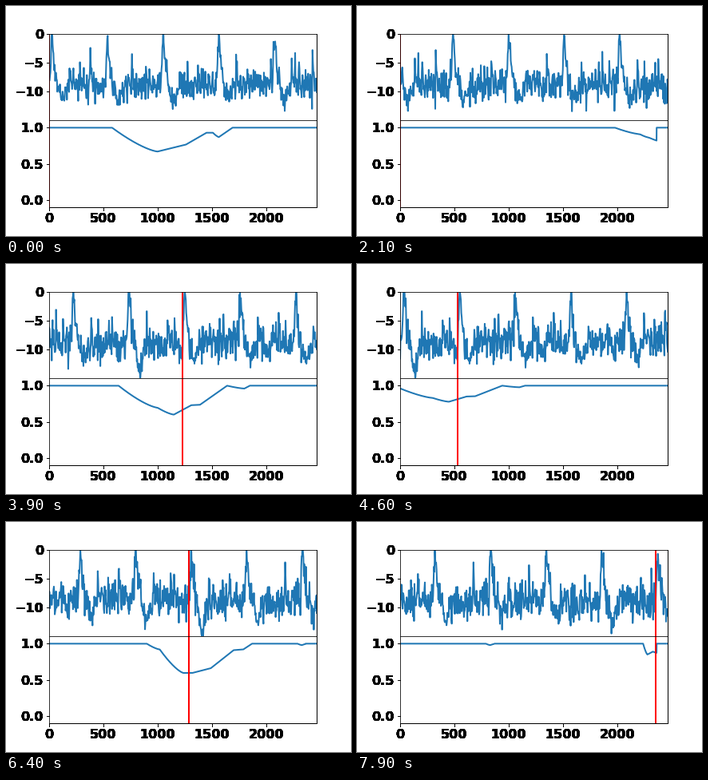
Animation of 432x288 px, one loop 8 s. Source, as a matplotlib script:

```python
import numpy as np
import matplotlib.pyplot as plt
from matplotlib.animation import FuncAnimation

FRAMES, INTERVAL = 80, 100
SPAN, STEP, LAG = 2465, 100, 100
PERIOD, PHASE = 512.4, 25
EDGE = SPAN - LAG
BLUE = "#1f77b4"

plt.rcParams.update({
    "font.family": "DejaVu Sans", "font.size": 16, "font.weight": "bold",
})


def make_signal():
    """Log level of a beat: loud burst, deep trough, regular small hits."""
    rng = np.random.default_rng(12)
    t = np.arange(0, FRAMES * STEP + SPAN, 4)
    beat = np.floor((t - PHASE) / PERIOD + 0.1).astype(int)
    p = t - PHASE - beat * PERIOD

    # one hit every sixteenth, accented before the next burst
    slot = (p // 32).astype(int)
    amps = rng.uniform(0.2, 4.2, (beat.max() + 1, 20))
    amps[:, 11] = rng.uniform(5.5, 7, len(amps))
    amps[:, 5] = 4.5
    hits = amps[beat, slot] * np.exp(-(p % 32) / 11)

    burst = np.where(p < 0, np.exp(-(p / 13) ** 2), np.exp(-np.abs(p / 27) ** 1.2))
    level = -9.6 + np.maximum(hits, 9.6 * burst)
    floor = -12.1 - rng.exponential(0.6, beat.max() + 1)[beat]
    trough = np.exp(-((p - 98) / 33) ** 2)
    level += trough * (floor + 1 - level)
    noise = rng.normal(0, 1, len(t)) * (1.15 + 0.5 * t / t[-1])
    return t, level + noise * (1 - 0.4 * trough)


# each dip: {frame: key points in window units}, blended between frames
DIPS = [
    {0: [(580, 1), (1000, .67), (1260, .765), (1450, .93), (1510, .93),
         (1565, .87), (1690, 1)]},
    {29: [(1180, 1), (1410, .91), (1490, .865), (1650, .79), (1850, .82),
          (2010, .76), (2150, .76), (2200, .69), (2270, .72), (2340, .50),
          (2800, 1)],
     39: [(640, 1), (1000, .695), (1150, .60), (1310, .73), (1390, .735),
          (1640, 1), (1800, .96), (1850, 1)]},
    {53: [(2240, 1), (2330, .76), (2800, 1)],
     64: [(900, 1), (1020, .92), (1240, .595), (1320, .595), (1490, .66),
          (1700, .91), (1790, .92), (1870, 1)]},
    {79: [(790, 1), (830, .98), (870, 1), (2240, 1), (2280, .85),
          (2330, .89), (2400, .86)]},
]


def trace(t, pts):
    """Join points; falling legs ease out, rising legs are straight."""
    xs, ys = np.array(pts, float).T
    k = np.clip(np.searchsorted(xs, t, side="right") - 1, 0, len(xs) - 2)
    u = np.clip((t - xs[k]) / (xs[k + 1] - xs[k]), 0, 1)
    u = np.where(ys[k + 1] < ys[k], 1 - (1 - u) ** 1.4, u)
    return ys[k] + u * (ys[k + 1] - ys[k])


def score(i):
    t = X + i * STEP
    y = np.ones(len(X))
    for keys in DIPS:
        first, last = min(keys), max(keys)
        a, b = (trace(t - f * STEP, keys[f]) for f in (first, last))
        mix = np.clip((i - first) / max(last - first, 1), 0, 1)
        fade = np.clip((last + 12 - i) / 9, 0, 1)
        y -= (1 - a - mix * (b - a)) * fade
    y[X >= EDGE] = 1
    return y


def mark_pos(i):
    """Every fifth burst is marked once it enters the window."""
    seen = [m for m in 5130 + 5 * PERIOD * np.arange(3) - i * STEP if m <= SPAN]
    return seen[-1] if seen else 0


X = np.arange(SPAN + 1)
T, LEVEL = make_signal()

fig, (top, low) = plt.subplots(2, 1, sharex=True, figsize=(6, 4), dpi=72)
fig.subplots_adjust(left=.125, right=.9, bottom=.125, top=.88, hspace=0)

# repeated ticks pile up their soft edges into heavy, hard labels
HEAVY = 10
top.set(xlim=(0, SPAN), ylim=(-15, 0), yticks=[0, -5, -10] * HEAVY)
low.set(ylim=(-.1, 1.1), yticks=[0, .5, 1] * HEAVY,
        xticks=[0, 500, 1000, 1500, 2000] * HEAVY)
top.tick_params(bottom=False)
for spine in (top.spines["right"], low.spines["right"], low.spines["bottom"]):
    spine.set_linewidth(1)

wave, = top.plot([], [], color=BLUE, lw=2)
curve, = low.plot([], [], color=BLUE, lw=2)
lines = [ax.axvline(0, color="red", lw=2) for ax in (top, low)]


def draw(i):
    wave.set_data(T - i * STEP, LEVEL)
    curve.set_data(X, score(i))
    pos = mark_pos(i)
    for line in lines:
        line.set_xdata([pos, pos])
    return [wave, curve, *lines]


anim = FuncAnimation(fig, draw, frames=FRAMES, interval=INTERVAL,
                     repeat=True, repeat_delay=0)
plt.show()
```
